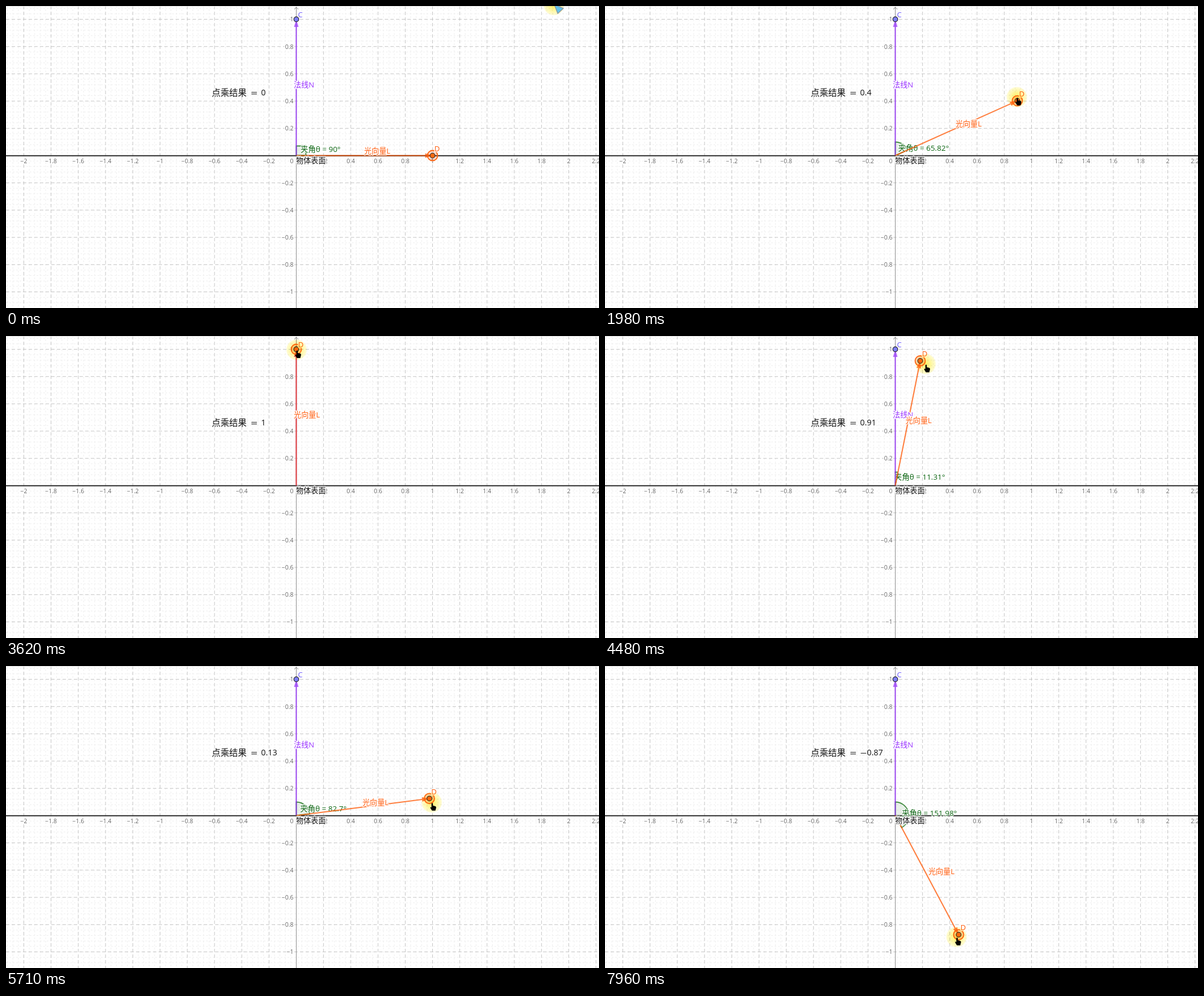
An HTML page that plays this animation: 1049x534 px, repeating every 7.99 s.

```html
<!DOCTYPE html>
<html lang="zh">
<head>
<meta charset="utf-8">
<style>
html, body { margin: 0; width: 100%; height: 100%; overflow: hidden; background: #fff; }
svg { display: block; width: 1049px; height: 534px; }
text { font-family: "Open Sans", "Noto Sans CJK SC", "Noto Sans CJK", "Noto Sans", sans-serif; font-size: 13.2px; white-space: pre; }
.halo { stroke: #fff; stroke-width: 3px; stroke-linejoin: round; paint-order: stroke; }
.tick { font-size: 10.5px; fill: #666; }
.result { font-size: 15.4px; fill: #111; }
.number { font-size: 14.3px; }
.math { font-family: "DejaVu Sans", sans-serif; font-size: 15.5px; fill: #444; }
#angle { font-size: 13.5px; stroke-width: 2px; }
#cursor circle { mix-blend-mode: multiply; }
</style>
</head>
<body>
<svg viewBox="0 0 1049 534">
  <defs>
    <radialGradient id="glow">
      <stop offset="0" stop-color="#fff03c" stop-opacity=".8"/>
      <stop offset=".5" stop-color="#fff25a" stop-opacity=".62"/>
      <stop offset="1" stop-color="#fff578" stop-opacity=".3"/>
    </radialGradient>
  </defs>
  <g id="grid" fill="none"></g>
  <path d="M513.5 534V2M510 6L513.5 2L517 6" fill="none" stroke="#8c8c8c"/>
  <g id="ticks"></g>
  <path d="M0 264.8H1049" stroke="#2b2b2b" stroke-width="2"/>
  <path id="arc" fill="#006400" fill-opacity=".09" stroke="#006400" stroke-opacity=".72" stroke-width="1.8"/>
  <text class="halo" id="angle" fill="#0a6410"></text>
  <g fill="#9933ff" stroke="#9933ff" opacity=".75">
    <path d="M513.5 264.5V36" stroke-width="2.3"/>
    <path d="M513.5 24L517.5 37H509.5Z" stroke="none"/>
  </g>
  <g fill="#ff5500" stroke="#ff5500" opacity=".75">
    <path id="shaft" stroke-width="2.1"/>
    <path id="head" stroke="none"/>
  </g>
  <circle cx="513.5" cy="23.5" r="4.3" fill="#7d7dff" stroke="#222" stroke-width="1.2"/>
  <g id="dot" stroke-width="1.8">
    <circle r="9" fill="#ff5500" fill-opacity=".24" stroke="#ff6410"/>
    <circle r="4.3" fill="#ff6a10" stroke="#333" stroke-width="1.2"/>
  </g>
  <text class="halo" x="513" y="278" fill="#111">物体表面</text>
  <text class="halo" id="normal" x="509" y="144" fill="#9933ff">法线N</text>
  <text class="halo" id="cName" x="516.5" y="20" fill="#705cff">C</text>
  <text class="halo" id="lightName" fill="#ff5a0a">光向量L</text>
  <text class="halo" id="dName" fill="#ff5a0a">D</text>
  <text class="result" x="364" y="158.5">点乘结果</text>
  <text class="math" x="432.5" y="158.5">=</text>
  <text class="math" id="minus" x="451" y="158.5">−</text>
  <text class="result number" id="value" y="158.3"></text>
  <g id="cursor">
    <circle r="18" fill="url(#glow)"/>
    <path id="arrow" d="M1 -1L17 6L7 15Z" fill="#62c3ee" stroke="#8e9aa0" stroke-width="1.5" stroke-linejoin="round"/>
    <path id="hand" transform="translate(1.4 1.4) scale(.86)" d="M-2 1Q-.5 -1.5 1 1V5L6 6.2Q8 7 7.6 9.5L6 15.5H-.8L-4.4 9.8Q-4.6 7.2 -2 8.6Z"/>
  </g>
</svg>
<script>
const LOOP = 7990, OX = 513.5, OY = 264.5, UNIT = 241;
const LAG = 45; // the dragged point trails the pointer
const $ = id => document.getElementById(id);
const set = (id, attrs) => { for (const k in attrs) $(id).setAttribute(k, attrs[k]); };
const show = (id, on) => set(id, { visibility: on ? 'visible' : 'hidden' });

// time, angle from the normal in degrees, length
const drag = [
  [870, 90, 1], [1680, 77, .985], [1980, 65.82, .9819], [2480, 42.6, .984],
  [2810, 21.31, .9757], [3280, 6.5, .985], [3610, 0, 1], [4130, 0, 1],
  [4560, 15.8, .915], [4910, 45, .849], [4980, 51.72, .8604], [5025, 55.5, .866],
  [5710, 82.7, .985], [6050, 90, 1], [7080, 90, 1], [7480, 119, .99],
  [7820, 146.3, 1], [7960, 151.98, .99], [8100, 156, .99]
];
const grip = [[2810, 2.5], [3500, .5], [5000, .5], [6000, 2.5]];
const nudge = [[6240, 0], [6390, 1], [6550, 1], [6770, 0]];

function slope(keys, i, c) {
  const a = keys[i - 1], b = keys[i], d = keys[i + 1];
  if (!a || !d || (b[c] - a[c]) * (d[c] - b[c]) <= 0) return 0;
  return (d[c] - a[c]) / (d[0] - a[0]);
}

function track(keys, t, c = 1) {
  const last = keys.length - 1;
  if (t <= keys[0][0]) return keys[0][c];
  if (t >= keys[last][0]) return keys[last][c];
  const i = keys.findIndex(k => k[0] > t) - 1;
  const a = keys[i], b = keys[i + 1], span = b[0] - a[0], u = (t - a[0]) / span;
  const v = 1 - u;
  return a[c] * v * v * (1 + 2 * u) + b[c] * u * u * (3 - 2 * u)
    + span * u * v * (slope(keys, i, c) * v - slope(keys, i + 1, c) * u);
}

function polar(deg, r) {
  const a = deg * Math.PI / 180;
  return [OX + r * Math.sin(a), OY - r * Math.cos(a)];
}
const pointAt = t => polar(track(drag, t), UNIT * track(drag, t, 2));
const trim = n => String(Math.round(n * 100) / 100 + 0);

function buildGrid() {
  let minor = '', major = '', labels = '';
  const step = UNIT / 25;
  for (let i = -55; i <= 55; i++) {
    const x = OX + i * step, y = OY + i * step;
    const lines = (x > 0 && x < 1049 ? `M${x} 0V534` : '') + (y > 0 && y < 534 ? `M0 ${y}H1049` : '');
    if (i % 5) { minor += lines; continue; }
    major += lines;
    const name = trim(i / 25).replace('-', '−');
    if (i) labels += `<text class="tick halo" text-anchor="middle" x="${x}" y="277.6">${name}</text>`;
    const row = OY - i * step;
    if (i && row > 0 && row < 534)
      labels += `<text class="tick halo" text-anchor="end" x="508.5" y="${row + 3.8}">${name}</text>`;
  }
  labels += '<text class="tick halo" text-anchor="end" x="508.5" y="277.6">0</text>';
  $('grid').innerHTML = `<path d="${minor}" stroke="#eee" stroke-dasharray="3 3"/>`
    + `<path d="${major}" stroke="#c4c4c4" stroke-dasharray="6 4"/><path d="M0 .5H1049" stroke="#ddd"/>`;
  $('ticks').innerHTML = labels;
}

function drawAngle(deg) {
  const open = deg > .2;
  show('arc', open);
  show('angle', open);
  if (!open) return;
  const [ex, ey] = polar(deg, 24);
  set('arc', {
    d: Math.abs(deg - 90) < .005
      ? `M${OX} ${OY}V${OY - 17}h17v17Z`
      : `M${OX} ${OY}V${OY - 24}A24 24 0 0 1 ${ex} ${ey}Z`
  });
  const half = deg * Math.PI / 360;
  set('angle', { x: 510.2 + 15.2 * Math.sin(half), y: 268.6 - 15 * Math.cos(half) });
  $('angle').textContent = `夹角θ = ${trim(deg)}°`;
}

function drawCursor(t) {
  let [x, y] = pointAt(t + LAG);
  const n = track(nudge, t);
  x += track(grip, t) + 2 * n;
  y += .8 + 8 * n;
  const u = Math.min(1, Math.max(0, (t - 30) / 780));
  const left = 1 - u * u * (3 - 2 * u);
  x += 212 * left;
  y -= 267 * left;
  const near = left < .06;
  show('arrow', !near);
  show('hand', near);
  set('cursor', { transform: `translate(${x} ${y})` });
}

function draw(t) {
  const deg = track(drag, t), len = track(drag, t, 2);
  const [x, y] = polar(deg, len * UNIT);
  const sin = Math.sin(deg * Math.PI / 180), cos = Math.cos(deg * Math.PI / 180);

  const bx = x - 13 * sin, by = y + 13 * cos;
  set('shaft', { d: `M${OX} ${OY}L${bx} ${by}` });
  set('head', { d: `M${x} ${y}L${bx + 4 * cos} ${by + 4 * sin}L${bx - 4 * cos} ${by - 4 * sin}Z` });
  set('dot', { transform: `translate(${x} ${y})` });
  set('dName', { x: x + 3.2, y: Math.max(20, y - 7.8) });
  set('lightName', { x: (OX + x) / 2 - 4.5 + .045 * deg, y: (OY + y) / 2 - 3.5 * sin });
  show('normal', deg > .8);
  show('cName', deg > .8);
  drawAngle(deg);

  const dot = Math.round(len * cos * 100) / 100;
  show('minus', dot < 0);
  set('value', { x: dot < 0 ? 463.3 : 451.3 });
  $('value').textContent = trim(Math.abs(dot));
  drawCursor(t);
}

buildGrid();
const start = performance.now();
function tick() {
  const t = (performance.now() - start) % LOOP;
  draw(Math.floor(t / 10) * 10);
  requestAnimationFrame(tick);
}
tick();
</script>
</body>
</html>
```
